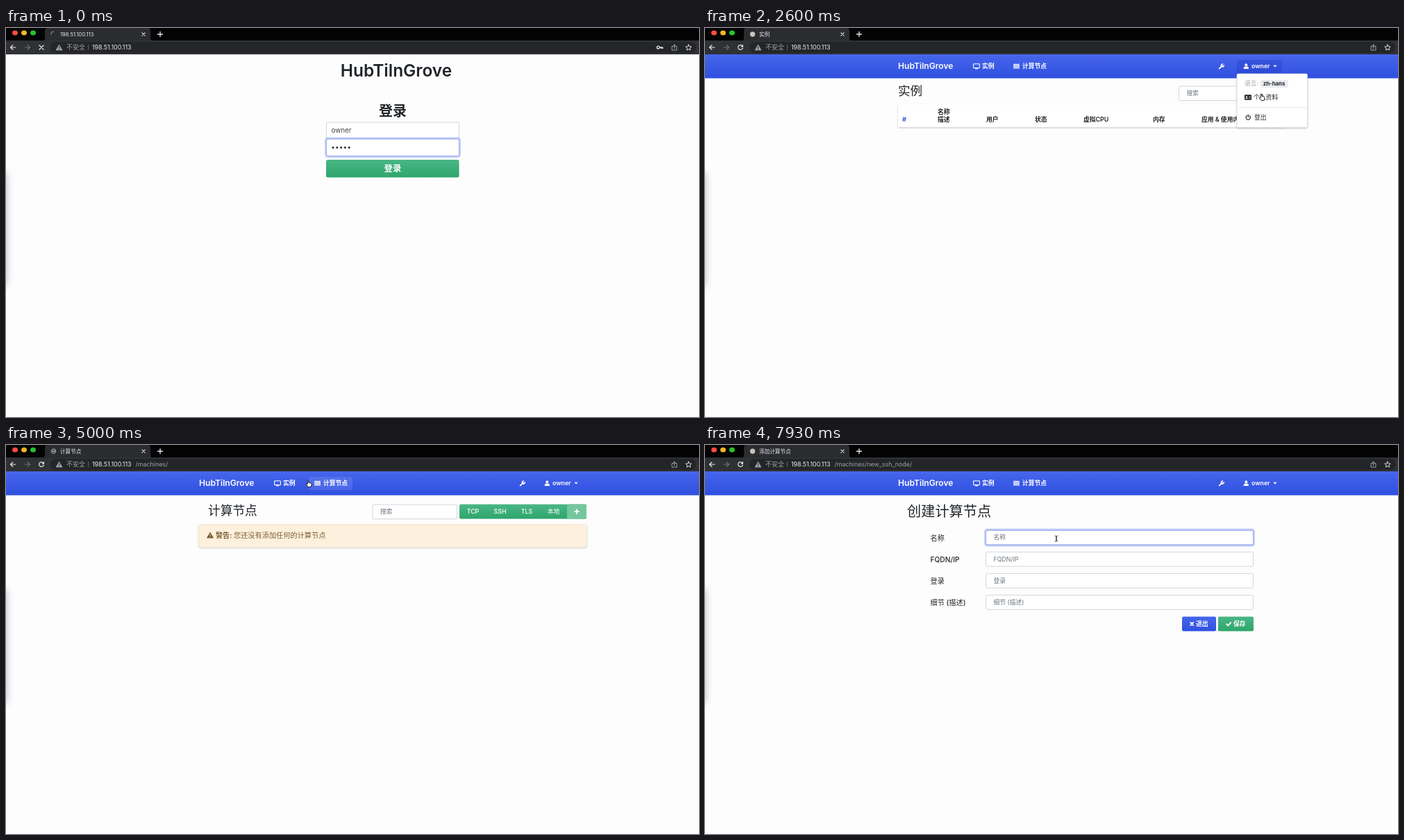
Recreate the animation shown at these times as an HTML page. Size 998 px wide and 561 px high, loop 8000 ms.

```html
<!DOCTYPE html>
<html lang="zh-CN">
<head>
<meta charset="utf-8">
<style>
html, body { margin: 0; width: 100%; height: 100%; overflow: hidden; background: #fdfdfd; }
svg { display: block; width: 100%; height: 100%; }
text { font-family: Inter, "Noto Sans CJK SC", "Noto Sans CJK", sans-serif; white-space: pre; }
</style>
</head>
<body>
<svg id="stage" viewBox="0 0 998 561" preserveAspectRatio="none"></svg>
<script>
const LOOP = 8000;
const BRAND = 'HubTilnGrove', HOST = '198.51.100.113', USER = 'owner';
const INK = '#212529', GRAY = '#6c757d', WHITE = '#fff';

// Drawing helpers
const text = (x, y, s, size = 8.75, fill = INK, weight = 400, anchor = 'start') =>
  `<text x="${x}" y="${y}" font-size="${size}" fill="${fill}" font-weight="${weight}" text-anchor="${anchor}">${s}</text>`;
const rect = (x, y, w, h, fill, r = 0, more = '') =>
  `<rect x="${x}" y="${y}" width="${w}" height="${h}" rx="${r}" fill="${fill}" ${more}/>`;
const dot = (x, y, r, fill, more = '') => `<circle cx="${x}" cy="${y}" r="${r}" fill="${fill}" ${more}/>`;
const line = (d, color, w = 1) =>
  `<path d="${d}" fill="none" stroke="${color}" stroke-width="${w}" stroke-linecap="round" stroke-linejoin="round"/>`;
const shape = (d, fill, more = '') => `<path d="${d}" fill="${fill}" ${more}/>`;
const group = (id, body) => `<g id="${id}">${body}</g>`;
const cross = (x, y, r, color, w) => line(`M${x - r} ${y - r}l${2 * r} ${2 * r}m0 ${-2 * r}l${-2 * r} ${2 * r}`, color, w);
const plus = (x, y, r, color, w) => line(`M${x - r} ${y}h${2 * r}M${x} ${y - r}v${2 * r}`, color, w);
const bullets = (x, y, step, r, fill) => [0, 1, 2, 3, 4].map(i => dot(x + i * step, y, r, fill)).join('');
const drop = (x, y, color) => shape(`M${x - 2.7} ${y - 1.3}h5.4l-2.7 2.8z`, color);
const field = (x, y, w, h, hint = '') =>
  rect(x, y, w, h, WHITE, 2, 'stroke="#cdd1da" stroke-width=".9"') + text(x + 11, y + h / 2 + 2.9, hint, 8.75, GRAY);
const ring = (x, y, w, h) =>
  rect(x - 1, y - 1, w + 2, h + 2, 'none', 3, 'stroke="#3459e6" stroke-opacity=".28" stroke-width="3"') +
  rect(x, y, w, h, 'none', 2, 'stroke="#9aacf3"');
const key = (x, y, color) =>
  dot(x - 2.2, y, 1.9, 'none', `stroke="${color}" stroke-width="1.3"`) + line(`M${x} ${y}h4.2v1.6m-1.8-1.6v1.4`, color, 1.3);
const warn = (x, y, color, hole) =>
  shape(`M${x} ${y - 4}l4.6 8h-9.2z`, color, `stroke="${color}" stroke-linejoin="round" stroke-width=".6"`) +
  rect(x - .5, y - 1.6, 1, 2.9, hole) + rect(x - .5, y + 2, 1, 1, hole);

const defs = `<defs>
  <linearGradient id="blue" x2="0" y2="1"><stop stop-color="#4766ec"/><stop offset="1" stop-color="#2f4fe0"/></linearGradient>
  <linearGradient id="green" x2="0" y2="1"><stop stop-color="#4ab685"/><stop offset="1" stop-color="#2ea66c"/></linearGradient>
  <filter id="soft" x="-5" y="-1" width="11" height="3"><feGaussianBlur stdDeviation="6"/></filter>
  <filter id="lift" x="-.1" y="-.2" width="1.2" height="1.5"><feDropShadow dx="0" dy="1" stdDeviation="1.2" flood-color="#223" flood-opacity=".25"/></filter>
  <filter id="deep" x="-.1" y="-.1" width="1.2" height="1.3"><feDropShadow dx="0" dy="2" stdDeviation="3.5" flood-opacity=".35"/></filter>
</defs>`;

const light = '#e8eaed', dim = '#9aa0a6';

const browser = () =>
  rect(0, 0, 998, 19, '#030303') +
  shape('M52 18.5q4 0 4-4V4q0-4 4-4h144q4 0 4 4v10.500q0 4 4 4z', '#2b2c2f') +
  rect(0, 18, 998, 20, '#303134') + rect(64, 20, 930, 16, '#242528', 8) +
  [['#fe4b45', 13], ['#f6b526', 26], ['#28c231', 39]]
    .map(([c, x]) => `<ellipse cx="${x}" cy="7" rx="4" ry="3.5" fill="${c}"/>`).join('') +
  cross(198, 9, 2.1, light, 1.1) + plus(222, 9, 3.5, light, 1.3) +
  line('M14 28h-7.500m3.400-3.200L6.500 28l3.400 3.200', light, 1.2) +
  line('M27 28h7.500m-3.400-3.200L34.500 28l-3.400 3.200', '#6d7074', 1.2) +
  group('stop', cross(51, 28, 3, light, 1.3)) +
  group('reload', line('M54 26a3.500 3.300 0 1 0 .4 3', light, 1.2) + shape('M55 23.800v3.600h-3.800z', light)) +
  warn(76.5, 28, dim, '#242528') + text(87, 31, '不安全', 9, dim) + rect(118, 24, .8, 8, '#6d7074') +
  text(124, 31, HOST, 8.9, light) +
  group('path1', text(186.5, 31, '/machines/', 8.9, dim)) +
  group('path2', text(186.5, 31, '/machines/new_ssh_node/', 8.9, dim)) +
  group('key', rect(932, 21.5, 20, 13, '#55575b', 6.5) + key(941.5, 28, light)) +
  group('keyPlain', key(941.5, 28, light)) +
  line('M961 26.500h-2v5.500h7v-5.500h-2M962.500 29.500v-5.500m-1.800 1.800l1.800-1.800l1.800 1.800', dim, 1) +
  line('M983 24l1.200 2.700l3 .3l-2.300 2l.7 3l-2.600-1.600l-2.600 1.600l.7-3l-2.300-2l3-.3z', light, .9) +
  group('spinner', line('M64.800 9a3.700 3.700 0 0 1 3.700-3.700', dim, 1.1)) +
  group('icon', dot(68.5, 9, 3.7, '#c9c3b8')) +
  group('globe', dot(68.5, 9, 3.7, '#8b8e92') + line('M66 7.500q2 2 4-.8M66.500 11.500q1.500-2 4-.5', '#2b2c2f', 1)) +
  [HOST, '实例', '计算节点', '添加计算节点'].map((s, i) => group('tab' + i, text(78, 11.6, s, 7.6, light))).join('');

const navbar = () =>
  rect(0, 38, 998, 34.5, 'url(#blue)') +
  group('navHover', rect(436, 46, 63, 19, WHITE, 2, 'opacity=".1"')) +
  group('userHover', rect(766, 46, 65, 19, '#1c2fb0', 2, 'opacity=".25"')) +
  text(278, 59.2, BRAND, 12.1, WHITE, 600) +
  rect(386.6, 51.8, 8.8, 5.8, 'none', .8, 'stroke="#fff" stroke-width="1.1"') + rect(389, 58.3, 4, 1.1, WHITE) +
  text(399, 58.4, '实例', 8.9, WHITE, 600) +
  [51.8, 54.2, 56.6].map(y => rect(444, y, 9, 1.9, WHITE, .4, 'opacity=".85"')).join('') +
  text(457, 58.4, '计算节点', 8.75, WHITE, 600) +
  line('M740.700 58.400l4.300-4', WHITE, 1.9) + line('M747.300 53.800a2 2 0 1 1-1.800-1.800', WHITE, 1.4) +
  dot(779.3, 53.2, 1.9, WHITE) + shape('M775.700 59v-1.200q0-2.300 2.300-2.300h2.600q2.300 0 2.300 2.300V59z', WHITE) +
  text(787, 58.2, USER, 8.75, WHITE, 600) + drop(821, 55, WHITE);

const login = () =>
  text(562, 70, BRAND, 24.4, INK, 600, 'middle') +
  text(557, 127, '登录', 20, INK, 600, 'middle') +
  field(461.5, 136, 191, 24) + text(468.500, 151, USER, 9.8, '#40454a') +
  rect(461.5, 160, 191, 25, WHITE) + ring(461.5, 160, 191, 24.5) + bullets(471, 172.5, 5.8, 1.45, INK) +
  rect(461, 190, 191.5, 25.6, 'url(#green)', 2.5) + text(557, 207.3, '登录', 12.4, WHITE, 600, 'middle');

const list = () =>
  text(278, 96.5, '实例', 17.6, INK, 500) +
  field(682.5, 84, 121.500, 20.700, '搜索') +
  rect(807, 83.700, 29.200, 21.200, 'url(#green)', 2) +
  group('addHover', rect(807, 83.7, 29.2, 21.2, '#145c3c', 2, 'opacity=".2"')) + plus(821.7, 94.2, 2.9, WHITE, 1.8) +
  rect(278, 110, 558, 33, WHITE, 1, 'filter="url(#lift)"') +
  text(284, 135.300, '#', 9.2, '#3459e6', 700) + text(335, 124, '名称', 8.9, INK, 600) +
  [[335, '描述'], [405, '用户'], [475, '状态'], [545, '虚拟CPU'], [645, '内存'], [715, '应用 &amp; 使用内存']]
    .map(([x, s]) => text(x, 135.300, s, 8.8, INK, 600)).join('');

const nodes = () =>
  text(291, 101.2, '计算节点', 17.7, INK, 500) +
  field(528, 86, 121.500, 20.700, '搜索') +
  rect(653, 85.5, 183, 21, 'url(#green)', 2) +
  group('sshHover', rect(692, 85.5, 39, 21, '#145c3c', 0, 'opacity=".2"')) +
  shape('M808 85.500h26q2 0 2 2v17q0 2-2 2h-26z', '#75c69d') +
  [[672.5, 'TCP'], [711.5, 'SSH'], [750, 'TLS'], [788.5, '本地']]
    .map(([x, s]) => text(x, 99.2, s, 8.75, WHITE, 500, 'middle')).join('') +
  plus(822, 96, 2.9, WHITE, 1.8) +
  rect(278, 115, 558, 32, '#fdf0dc', 2, 'stroke="#fbe8cc" filter="url(#lift)"') +
  warn(294, 130, '#6f5526', '#fdf0dc') + text(302, 133.600, '警告:', 10.1, '#7a6033', 600) +
  text(328, 133.600, '您还没有添加任何的计算节点', 10.2, '#7a6033');

const form = () =>
  text(291, 103.300, '创建计算节点', 20.2, INK, 500) +
  ['名称', 'FQDN/IP', '登录', '细节 (描述)'].map((s, i) => {
    const y = 123 + i * 31.2;
    return text(324.5, y + 14.5, s, 10.2, INK, 500) + field(404.5, y, 385, 20.8, s);
  }).join('') +
  group('focus', ring(404.5, 123, 385, 21)) + group('caret', rect(414.5, 128, .8, 10, INK)) +
  rect(687, 247.5, 49, 21, 'url(#blue)', 2) + cross(701.2, 258, 2, WHITE, 1.8) + text(707, 261.3, '退出', 8.9, WHITE, 600) +
  rect(739, 247.5, 51, 21, 'url(#green)', 2) + line('M751 258.200l2.200 2.200l4-4.300', WHITE, 1.8) +
  text(761, 261.3, '保存', 8.75, WHITE, 600);

const wheel = x => dot(x, 85.5, 7.4, 'none', 'stroke="#dfe5ee" stroke-width="1.2"');
const bubble = () =>
  rect(790, 37.5, 204.5, 159, '#202124', 3, 'filter="url(#deep)"') +
  cross(984, 43.5, 2.2, dim, 1) +
  line('M806 80q22-9 44-3t42 14t36 1', '#6d7176', .9) + line('M924 93.500h50', '#6d7176', .9) +
  rect(827, 57, 94, 22, '#7d8186', 11) + key(842, 68.3, '#35373b') +
  shape('M859 63l10 5.200l-10 5.200z', WHITE) + dot(878, 68.2, 5, '#3c4043') +
  shape('M893 62.400l6 5.800l-6 5.800l-6-5.800z', WHITE) + dot(908, 68.2, 4.8, 'none', 'stroke="#3c4043" stroke-width="1.2"') +
  shape('M854.500 48l6-4l1 6z', '#3fa66b') + dot(927.5, 55, 3.1, '#5b8def') +
  shape('M893.500 81.500l5-2l2.500 4l-5 2.500z', '#f3bd42') +
  wheel(934.500) + wheel(962.3) +
  line('M934.500 85.500l7-10h15l-9 10zM957 72l5.300 13.500', '#4b86ea', 1.4) +
  shape('M936 66q4-5 11-4l7 3l3 8l-2.500 1l-5-5l-4 8h-8z', '#2a9c68') + line('M942 75l7 3l-2 8', '#c8d4e8', 2.2) +
  dot(952.500, 60, 3, '#d9a58c') + shape('M949 59q1-4 6-3l1 2z', '#e8eaed') +
  text(800, 114.6, '要保存密码吗?', 9.8, light) +
  text(800, 132.700, '用户名', 8, light) + rect(834, 121, 150, 18, '#18191b', 2) + text(838, 132.500, USER, 7.8, light) + drop(976.5, 130, light) +
  text(800, 156.500, '密码', 8, light) + rect(834, 145, 129.500, 17.500, '#18191b', 2) + bullets(841, 153.6, 4.9, 1.1, light) + drop(956, 154, light) +
  line('M974.500 153.700q4.500-5 9 0q-4.500 5-9 0z', dim, 1) + dot(979, 153.7, 1.4, dim) +
  rect(892, 171, 44, 17, '#202124', 2, 'stroke="#3c4043" stroke-width=".8"') + text(914, 182.4, '一律不', 8, '#8ab4f8', 500, 'middle') +
  rect(940.5, 170.7, 43.500, 17.500, '#7da5f5', 2) + text(962.2, 182.4, '保存', 8, '#202124', 500, 'middle');

const menu = () =>
  rect(766, 66, 101.500, 77.500, WHITE, 2, 'stroke="#d5d8dd" stroke-width=".8" filter="url(#lift)"') +
  text(777, 83.3, '语言:', 8.75, '#a0a5aa') + rect(800, 75, 39.500, 11, '#e9ebee', 2) + text(819.5, 83, 'zh-hans', 7.8, INK, 700, 'middle') +
  rect(777, 96.3, 10, 7.4, INK, 1) + dot(780, 99, 1.1, WHITE) + rect(778.4, 100.6, 3.2, 1.4, WHITE) +
  line('M783.500 99h2m-2 2h2', WHITE, .7) + text(790, 103.2, '个人资料', 8.8, INK) +
  rect(766.5, 114, 100.500, .8, '#e6e8eb') +
  line('M780.300 126.400a3.200 3.200 0 1 0 3.800 0M782.200 125v3.600', INK, 1.2) + text(791, 132.2, '登出', 8.75, INK);

const pointers =
  group('arrow', shape('M0 0v8.500l2.100-1.900l1.500 3.300l1.500-.7l-1.500-3.200h2.800z', '#000', 'stroke="#fff" stroke-width=".7"')) +
  group('hand', shape('M-.8.200q.8-.9 1.500 0v3l3.300.7q1.200.4 1 1.700l-.7 3.700h-4.600l-2.700-3.500q.2-1.300 2.200-.2z', WHITE, 'stroke="#111" stroke-width=".9"')) +
  group('beam', line('M-1.800-4q1.800 0 1.800 1.200v5.600q0 1.200-1.800 1.200M1.800-4q-1.800 0-1.800 1.200v5.600q0 1.200 1.800 1.200', '#222', .9));

stage.innerHTML = defs + rect(0, 0, 998, 561, '#fdfdfd') +
  rect(-14, 208, 14, 164, '#2c2c48', 4, 'opacity=".35" filter="url(#soft)"') +
  group('login', login()) + group('list', list()) + group('nodes', nodes()) + group('form', form()) +
  group('navbar', navbar()) + browser() + group('menu', menu()) + group('bubble', bubble()) + group('pointer', pointers);

// Visible spans: id, from, to, fade-in length
const PAGE = [420, 4800, 5960];
const spans = [
  ['login', 0, PAGE[0]], ['list', PAGE[0], PAGE[1]], ['nodes', PAGE[1], PAGE[2]], ['form', PAGE[2], LOOP],
  ['tab0', 0, PAGE[0]], ['tab1', PAGE[0], PAGE[1]], ['tab2', PAGE[1], PAGE[2]], ['tab3', PAGE[2], LOOP],
  ['path1', PAGE[1], PAGE[2]], ['path2', PAGE[2], LOOP], ['navbar', PAGE[0], LOOP],
  ['keyPlain', 0, 930], ['key', 930, 1860], ['bubble', 930, 1830, 90], ['menu', 2330, 2980], ['userHover', 2180, 2980],
  ['addHover', 3900, 4240], ['navHover', 4640, 5200], ['sshHover', 5470, PAGE[2]],
  ['focus', 7620, LOOP, 130], ['caret', 7660, 7900]
];
const loads = [[0, PAGE[0]], [4710, PAGE[1]], [5660, PAGE[2]]];

// Pointer path: time, x, y, kind in use from that time
const path = [
  [180, 662, 222, 'arrow'], [900, 690, 200, 'arrow'], [1300, 923, 175, 'arrow'], [1780, 921, 177, 'arrow'],
  [2180, 803, 58, 'hand'], [2330, 802, 55, 'hand'], [2580, 801, 95, 'hand'], [2720, 802, 96, 'arrow'],
  [3100, 872, 92, 'arrow'], [3580, 840, 85, 'arrow'], [3780, 857, 97, 'arrow'], [3900, 832, 94, 'hand'],
  [4000, 822, 93, 'hand'], [4200, 822, 93, 'arrow'], [4680, 446, 53, 'hand'], [4980, 435, 51, 'hand'],
  [5120, 437, 52, 'arrow'], [5560, 709, 94, 'hand'], [PAGE[2], 706, 94, 'arrow'], [6400, 702, 94, 'arrow'],
  [6800, 700, 97, 'arrow'], [7200, 590, 126, 'beam'], [7600, 506, 135, 'beam']
];

const el = id => document.getElementById(id);
const show = (id, on) => el(id).setAttribute('opacity', +on);
const smooth = p => p * p * (3 - 2 * p);

function draw(t) {
  for (const [id, a, b, fade] of spans)
    show(id, t < a || t >= b ? 0 : fade ? Math.min(1, (t - a) / fade) : 1);

  const busy = loads.some(([a, b]) => t >= a && t < b);
  const globe = t >= PAGE[1] && t < PAGE[2];
  show('stop', busy);
  show('reload', !busy);
  show('spinner', busy);
  show('icon', !busy && !globe);
  show('globe', !busy && globe);
  el('spinner').setAttribute('transform', `rotate(${t * .36} 68.5 9)`);

  let i = path.length - 1;
  while (i > 0 && path[i][0] > t) i--;
  const [t0, x0, y0, kind] = path[i];
  const [t1, x1, y1] = path[i + 1] || [LOOP, x0, y0];
  const p = smooth(Math.max(0, (t - t0) / (t1 - t0)));
  show('pointer', t >= t0);
  el('pointer').setAttribute('transform', `translate(${x0 + (x1 - x0) * p} ${y0 + (y1 - y0) * p})`);
  for (const k of ['arrow', 'hand', 'beam']) show(k, k === kind);
}

const start = performance.now();
function tick() {
  draw((performance.now() - start) % LOOP);
  requestAnimationFrame(tick);
}
tick();
</script>
</body>
</html>
```
